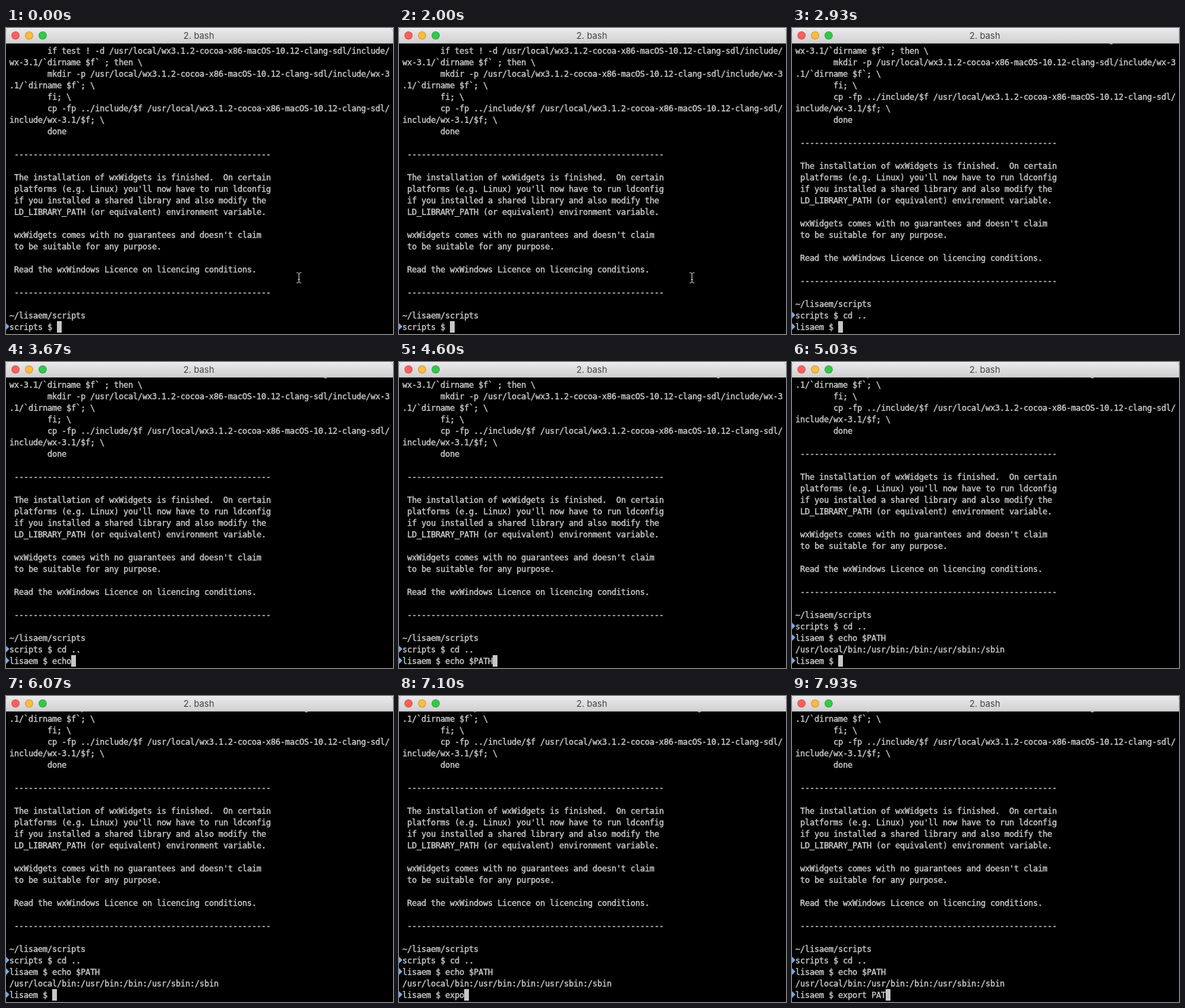
These frames come from a looping animation (570 px wide and 452 px high, 8 s). An HTML page:

```html
<!DOCTYPE html>
<html lang="en">
<head>
<meta charset="utf-8">
<title>Terminal</title>
<style>
  html, body { margin: 0; width: 100%; height: 100%; overflow: hidden; background: #fff; }
  .window {
    position: absolute; left: 0; top: 0; width: 570px; height: 452px;
    overflow: hidden; border-radius: 5px 5px 0 0; background: #000;
  }
  .bar {
    position: absolute; inset: 0 0 auto; height: 23px; box-sizing: border-box;
    background: linear-gradient(#ebe9eb, #d2d0d2); border-bottom: 1px solid #b4b2b4;
    box-shadow: inset 0 1px #f5f4f5;
    font: 13px/23px Inter, sans-serif; color: #444; text-align: center;
  }
  .bar span { position: relative; left: -1px; }
  .bar i {
    position: absolute; top: 5px; width: 12px; height: 12px; box-sizing: border-box;
    border-radius: 50%; border: .5px solid #0003;
  }
  .screen { position: absolute; inset: 23px 0 0; overflow: hidden; }
  pre {
    position: absolute; left: 5px; bottom: 1px; margin: 0;
    font: 12px/17px "DejaVu Sans Mono", monospace;
    letter-spacing: calc(7px - 1ch); color: #c7c7c7;
    -webkit-text-stroke: .4px #c7c7c7;
  }
  pre i {
    position: absolute; width: 5px; height: 10px; margin: 2px 0 0 -5px;
    background: #7aa8ea; clip-path: polygon(0 0, 100% 50%, 0 100%);
  }
  pre b {
    display: inline-block; position: relative; top: -1px;
    width: 7px; height: 17px; vertical-align: top; background: #c7c7c7;
  }
  svg { position: absolute; left: 427px; top: 360px; }
</style>
</head>
<body>
<div class="window">
  <div class="bar">
    <i style="left:8px;background:#fc605c"></i>
    <i style="left:28px;background:#fdbc40"></i>
    <i style="left:48px;background:#34c84a"></i>
    <span>2. bash</span>
  </div>
  <div class="screen"><pre id="term">
        if test ! -d /usr/local/wx3.1.2-cocoa-x86-macOS-10.12-clang-sdl/include/
wx-3.1/`dirname $f` ; then \
        mkdir -p /usr/local/wx3.1.2-cocoa-x86-macOS-10.12-clang-sdl/include/wx-3
.1/`dirname $f`; \
        fi; \
        cp -fp ../include/$f /usr/local/wx3.1.2-cocoa-x86-macOS-10.12-clang-sdl/
include/wx-3.1/$f; \
        done

 ------------------------------------------------------

 The installation of wxWidgets is finished.  On certain
 platforms (e.g. Linux) you'll now have to run ldconfig
 if you installed a shared library and also modify the
 LD_LIBRARY_PATH (or equivalent) environment variable.

 wxWidgets comes with no guarantees and doesn't claim
 to be suitable for any purpose.

 Read the wxWindows Licence on licencing conditions.

 ------------------------------------------------------

~/lisaem/scripts
scripts $ </pre></div>
  <svg id="mouse" width="9" height="18" fill="none" stroke="#d0d0d0">
    <path d="M1 1.5H2.5Q4.5 1.5 4.5 4V14Q4.5 16.5 2.5 16.5H1M8 1.5H6.5Q4.5 1.5 4.5 4M8 16.5H6.5Q4.5 16.5 4.5 14M3 11.5H6"/>
  </svg>
</div>
<script>
  const LOOP = 8000, MOUSE_HIDE = 2030;
  const term = document.getElementById('term');
  const mouse = document.getElementById('mouse');
  const log = term.textContent;

  // [time in ms, text added to the terminal]
  const output = [
    [2030, 'c'], [2130, 'd'], [2230, ' '], [2530, '.'], [2700, '.'],
    [2930, '\nlisaem $ '],
    [3230, 'e'], [3370, 'c'], [3470, 'h'], [3670, 'o'], [3830, ' '],
    [4070, '$'], [4230, 'P'], [4500, 'AT'], [4600, 'H'],
    [5000, '\n/usr/local/bin:/usr/bin:/bin:/usr/sbin:/sbin\nlisaem $ '],
    [6570, 'e'], [6730, 'x'], [6900, 'p'], [7030, 'o'], [7130, 'r'],
    [7330, 't'], [7430, ' '], [7600, 'P'], [7700, 'A'], [7930, 'T']
  ];

  let shown = -1;
  function draw(now) {
    const t = now % LOOP;
    const count = output.filter(([at]) => at <= t).length;
    if (count !== shown) {
      shown = count;
      const text = log + output.slice(0, count).map(([, s]) => s).join('');
      // Each prompt line gets a marker; the block cursor follows the text.
      term.innerHTML = text.replace(/^(?=\w+ \$ )/gm, '<i></i>') + '<b></b>';
    }
    mouse.style.visibility = t < MOUSE_HIDE ? 'visible' : 'hidden';
    requestAnimationFrame(draw);
  }
  draw(performance.now());
</script>
</body>
</html>
```
